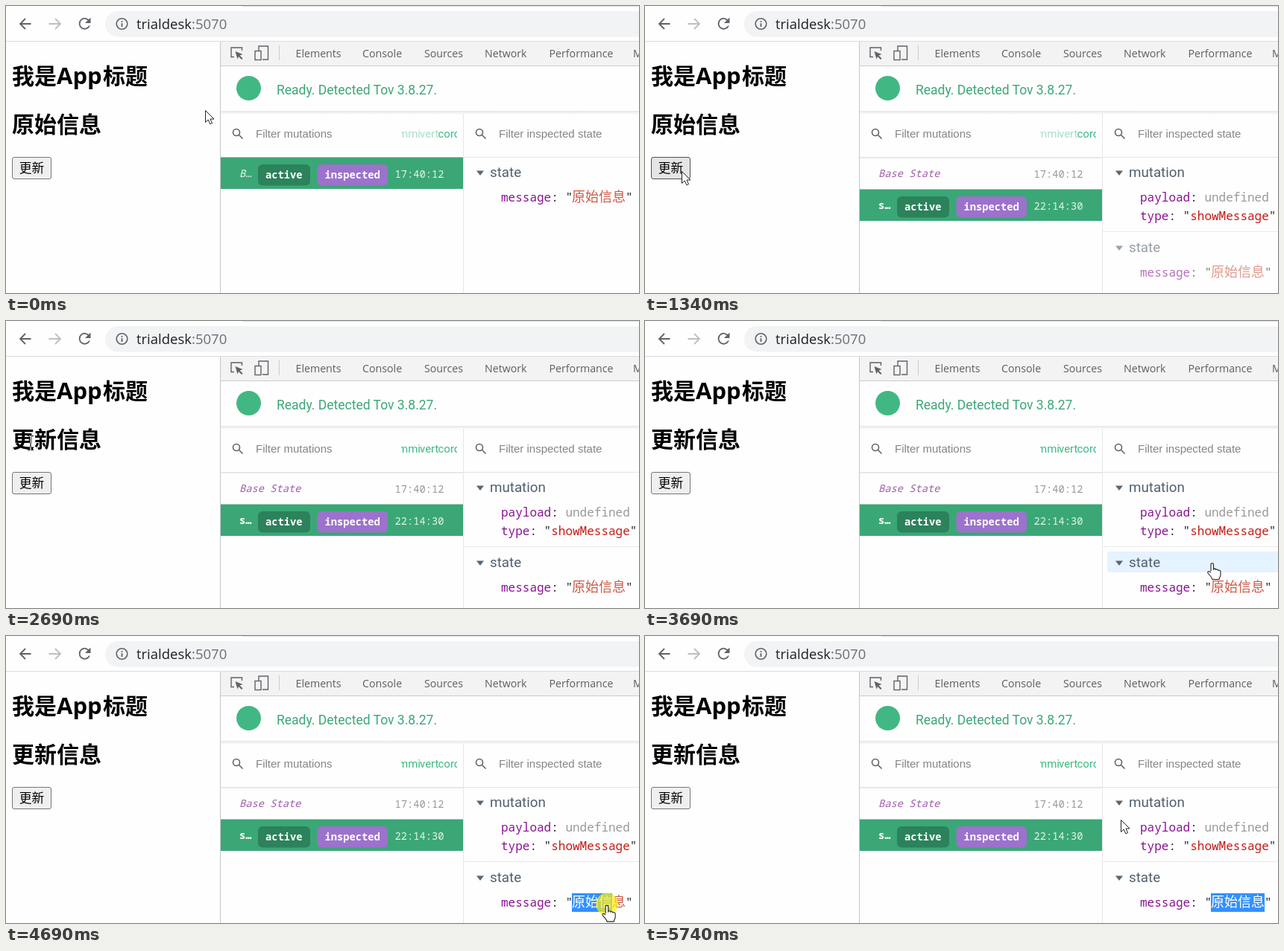
These frames come from a looping animation (849x386 px, 5810 ms). An HTML page:

```html
<!DOCTYPE html>
<html lang="zh">
<head>
<meta charset="utf-8">
<title>State inspector demo</title>
<style>
html, body { margin: 0; width: 100%; height: 100%; overflow: hidden; background: #fff; }
svg { display: block; width: 849px; height: 386px; }
text { white-space: pre; }
.cjk { font-family: "Noto Sans CJK SC", "Noto Sans CJK", sans-serif; }
.title { font-size: 30px; font-weight: 700; }
.ui { font-family: "Open Sans", "Noto Sans", sans-serif; }
.tab { font-size: 14.2px; fill: #5a5f64; }
.rob { font-family: Roboto, sans-serif; }
.filter { font: 15px "Liberation Sans", sans-serif; fill: #858585; }
.mono { font-family: "Noto Sans Mono", "DejaVu Sans Mono", monospace; font-size: 13.75px; }
.code { font-size: 16px; }
.value { font-size: 18px; font-weight: 300; }
.section { font-size: 18.75px; fill: #51606f; }
.key { fill: #881391; }
.str { fill: #c41a16; }
.thin { fill: #cb5a45; }
.quote { fill: #222; }
.icon { fill: none; stroke: #5f6368; }
.action { font-size: 15px; fill: #3fb984; }
.hidden { display: none; }
</style>
</head>
<body>
<svg viewBox="0 0 849 386">
  <defs>
    <clipPath id="mmiClip"><rect x="530" y="160" width="25.5" height="24"/></clipPath>
    <clipPath id="cordClip"><rect x="579" y="160" width="26" height="24"/></clipPath>
    <clipPath id="selClip"><rect id="selArea" x="759" y="345" width="0" height="27"/></clipPath>
    <linearGradient id="shade" x1="0" y1="0" x2="0" y2="1">
      <stop offset="0" stop-color="#e6e6e6"/><stop offset="1" stop-color="#fdfdfd"/>
    </linearGradient>
    <g id="lens" class="icon" stroke="#858585" stroke-width="1.6">
      <circle r="4.5" cx="-2" cy="-2"/><path d="M1.3 1.3 6.5 6.5"/>
    </g>
    <path id="fold" d="M-5-3H5L0 3.5z" fill="#5c6670"/>
  </defs>
  <rect width="849" height="386" fill="#fefefe"/>

  <!-- browser bar -->
  <path d="M316 0H849V1H318Z" fill="#dee1e6"/>
  <rect x="133" y="7" width="740" height="34.5" rx="17.2" fill="#f1f3f4"/>
  <path d="M0 47.5H849" stroke="#dadce0"/>
  <g class="icon" stroke-width="1.8">
    <path d="M33.5 24H19.5M26 17l-7 7 7 7"/>
    <path d="M57.5 24H72.5M66 17l7 7-7 7" stroke="#bcbec1"/>
    <path d="M111.5 20A7 7 0 1 0 112 26.5"/>
    <circle cx="155.5" cy="24" r="7.3" stroke-width="1.6"/>
    <path d="M155.5 20v1.8M155.5 23.2V28"/>
  </g>
  <path d="M113.5 15.5V23H106z" fill="#5f6368"/>
  <text class="ui" x="175" y="31" font-size="18.5" fill="#202124">trialdesk<tspan fill="#6b6f73">:5070</tspan></text>

  <!-- page -->
  <text class="cjk title" y="105"><tspan x="8">我是</tspan><tspan class="ui" x="68" font-size="31">App</tspan><tspan x="130">标题</tspan></text>
  <text class="cjk title" id="headline" x="8" y="170"></text>
  <rect id="button" x="8.5" y="203.5" width="52" height="29" rx="2.5"/>
  <text class="cjk" x="17.8" y="224" font-size="16.7">更新</text>

  <!-- inspector frame -->
  <path d="M287.5 48V386" stroke="#c4c6c9"/>
  <rect x="288" y="48" width="561" height="32" fill="#f3f3f3"/>
  <path d="M288 80.5H849" stroke="#cbcbcb"/>
  <g class="icon" stroke-width="1.4">
    <path d="M306 68.5H302V56H316.5V60"/>
    <path d="M339 60V54H351.5V72H344"/><rect x="334" y="60.5" width="8" height="12"/>
  </g>
  <path d="M307.5 61 317.5 65 313.5 66.5 317.5 70.5 316 72 312 68 310.5 71.5z" fill="#5f6368"/>
  <path d="M366.5 53V73" stroke="#ccc"/>
  <g class="ui tab">
    <text x="388.5" y="69">Elements</text><text x="478" y="69">Console</text>
    <text x="561" y="69">Sources</text><text x="642" y="69">Network</text>
    <text x="728.5" y="69">Performance</text><text x="841" y="69">Memory</text>
  </g>
  <circle cx="325.5" cy="110.5" r="16.5" fill="#41b883"/>
  <text class="rob" x="363" y="119" font-size="17.5" fill="#3ba776">Ready. Detected Tov 3.8.27.</text>
  <rect x="288" y="141" width="561" height="5" fill="url(#shade)"/>
  <use href="#lens" x="311" y="172"/><text class="filter" x="335" y="177">Filter mutations</text>
  <use href="#lens" x="637" y="172"/><text class="filter" x="661" y="177">Filter inspected state</text>
  <g class="rob action">
    <g id="actions">
      <text x="526" y="177" clip-path="url(#mmiClip)">mmi</text><text x="555" y="177">vert</text>
    </g>
    <text x="579.5" y="177" clip-path="url(#cordClip)">cord</text>
  </g>
  <path d="M288 203.5H849M613.5 145V386" stroke="#e6e6e6"/>

  <!-- mutation list -->
  <g class="mono">
    <g id="baseRow">
      <path d="M288 204.5H613" stroke="#e9e9e9"/>
      <text x="313" y="230" font-style="italic" fill="#a05cad">Base State</text>
      <text x="521.5" y="231" fill="#999">17:40:12</text>
    </g>
    <g id="activeRow" fill="#fff">
      <rect x="288" y="203.5" width="325" height="42.5" fill="#3ba776"/>
      <text id="baseLabel" x="313" y="230" font-style="italic" fill="#eef8f3">B…</text>
      <text id="newLabel" x="313" y="230" font-weight="700">s…</text>
      <rect x="338" y="213" width="70" height="28.5" rx="6" fill="#2b825b"/>
      <rect x="417.5" y="213" width="94.5" height="28.5" rx="6" fill="#9c72cc"/>
      <text x="348" y="232" font-weight="700">active</text>
      <text x="427.5" y="232" font-weight="700">inspected</text>
      <text id="rowTime" x="521.5" y="231" fill="#e4f3ec"></text>
    </g>
  </g>

  <!-- state pane -->
  <g id="mutation">
    <use href="#fold" x="636" y="224.5"/>
    <text class="rob section" x="649" y="230">mutation</text>
    <text class="mono code quote" x="664" y="263"><tspan class="key">payload</tspan>: <tspan fill="#999">undefined</tspan></text>
    <text class="mono code quote" x="664" y="288"><tspan class="key">type</tspan>: "<tspan class="str">showMessage</tspan>"</text>
    <path d="M614 303.5H849" stroke="#e9e9e9"/>
  </g>
  <rect id="hover" x="620" y="310" width="240" height="28" rx="3" fill="#e5f2ff"/>
  <g id="state">
    <use href="#fold" x="636" y="224.5"/>
    <text class="rob section" x="649" y="230">state</text>
    <text class="mono code quote" x="664" y="263"><tspan class="key">message</tspan>: "<tspan x="831">"</tspan></text>
    <text class="cjk value thin" x="759" y="263">原始信息</text>
  </g>
  <g clip-path="url(#selClip)">
    <rect x="759" y="346" width="72" height="25" fill="#3390ff"/>
    <text class="cjk value" x="759" y="364" fill="#fff">原始信息</text>
  </g>

  <!-- pointer -->
  <circle id="press" r="15" fill="#ffee10" fill-opacity=".7"/>
  <path id="arrow" d="M.5.5V16.5L4.2 13 6.8 18.8 9.5 17.6 7 12H12z" fill="#fff" stroke="#222"/>
  <path id="hand" d="M-2 12.5V4C-2 1 1.5 1 1.5 4V10C2.5 8.500 4.500 9 4.700 10.500 6 9.500 7.500 10 7.800 11.500 9.500 10.700 11 11.500 11 13.500V17.500C11 19.500 9.500 20.500 9 23.500H0C-.5 20.500-3.500 18.500-6 15-7 13-4.500 11.500-2 14.500" fill="#fff" stroke="#222" stroke-width="1.1"/>
  <path id="beam" d="M-4-9.5H-1.5L0-8.5 1.5-9.5H4M0-9V9M-4 9.5H-1.5L0 8.5 1.5 9.5H4" fill="none" stroke="#fff" stroke-width="1.2" style="mix-blend-mode:difference"/>
</svg>
<script>
const LOOP = 5810, TICK = 66.7, LAST_TICK = 86;
// pointer stops: tick, x, y
const path = [
  [0, 267, 140], [9, 50, 223], [10, 49, 222], [26, 49, 222],
  [35, 190, 197], [40, 33, 164], [42, 50, 137], [44, 40, 142],
  [53, 786, 303], [54, 774, 315], [55, 761, 324], [61, 766, 352],
  [63, 766, 352], [71, 808, 361], [77, 826, 364], [83, 826, 364],
  [84, 770, 325], [85, 700, 288], [86, 638, 247]
];
const $ = id => document.getElementById(id);
const show = (id, on) => $(id).classList.toggle('hidden', !on);
const within = (v, a, b) => v >= a && v < b;
const move = (id, x, y) => $(id).setAttribute('transform', `translate(${x} ${y})`);

function pointerAt(tick) {
  const i = Math.max(1, path.findIndex(p => p[0] >= tick));
  const [t0, x0, y0] = path[i - 1], [t1, x1, y1] = path[i];
  let k = (tick - t0) / (t1 - t0);
  if (t1 - t0 >= 8) k = k * k * (3 - 2 * k);
  return [x0 + (x1 - x0) * k, y0 + (y1 - y0) * k];
}

function draw(tick) {
  const [x, y] = pointerAt(tick);
  const committed = tick >= 20;
  const fade = Math.min(1, Math.max(0, (tick - 20) / 2));
  const onButton = within(x, 8, 61) && within(y, 203, 233);
  const onState = x > 620 && within(y, 310, 340);
  const onValue = x > 751 && y >= 340;
  const onTitle = x < 128 && within(y, 140, 182);
  const pressed = within(tick, 13, 15) || within(tick, 63, 81);

  $('headline').textContent = tick < 27 ? '原始信息' : '更新信息';
  $('button').setAttribute('fill', !onButton ? '#efefef' : pressed ? '#f5f5f5' : '#e5e5e5');
  $('button').setAttribute('stroke', onButton ? '#4f4f4f' : '#767676');

  show('baseRow', committed);
  show('mutation', committed);
  show('baseLabel', !committed);
  show('newLabel', committed);
  $('rowTime').textContent = committed ? '22:14:30' : '17:40:12';
  move('activeRow', 0, committed ? 43 : 0);
  move('state', 0, committed ? 101 : 0);
  $('state').setAttribute('opacity', committed ? .6 + .4 * fade : 1);
  $('actions').setAttribute('opacity', .45 + .55 * fade);
  show('hover', onState);

  const chars = tick < 63 ? 0 : tick > 77 ? 4 : Math.round((x - 759) / 18);
  $('selArea').setAttribute('width', chars * 18);

  const cursor = onState || onValue ? 'hand' : onTitle ? 'beam' : 'arrow';
  for (const id of ['arrow', 'hand', 'beam']) {
    show(id, id === cursor);
    move(id, x, y);
  }
  show('press', pressed);
  move('press', x, y);
}

const start = performance.now();
function frame() {
  const t = (performance.now() - start) % LOOP;
  draw(Math.min(LAST_TICK, Math.floor(t / TICK)));
  requestAnimationFrame(frame);
}
frame();
</script>
</body>
</html>
```
